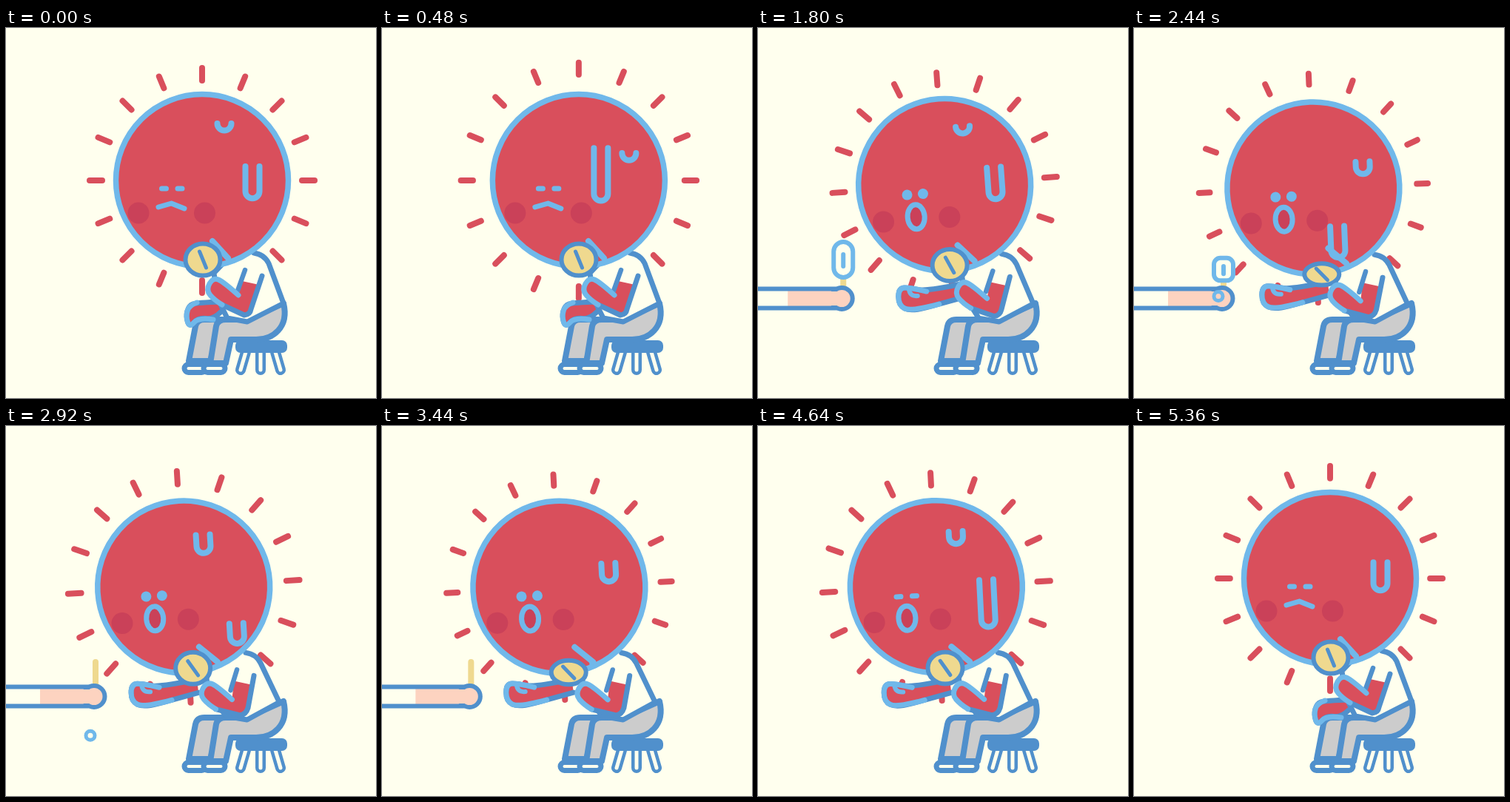
An HTML page for the animation above (5400 ms loop, 500 by 500 pixels).

```html
<!DOCTYPE html>
<html lang="en">
<head>
<meta charset="utf-8">
<title>Melting sun</title>
<style>
  html, body { margin: 0; width: 100%; height: 100%; overflow: hidden; background: #ffffee; }
  svg { display: block; width: 100vw; height: 100vh; }
</style>
</head>
<body>
<svg id="stage" viewBox="0 0 500 500" fill="none" stroke-linecap="round" stroke-linejoin="round"></svg>
<script>
const LOOP = 5400, BEAT = 900, STEP = 40;
const RED = '#d94f5c', CHEEK = '#ca4159', LIGHT = '#70b8ea', DARK = '#5090cc';
const YELLOW = '#efd98f', PEACH = '#fdd3c0', GRAY = '#cccccc', PAPER = '#ffffee';
const stage = document.getElementById('stage');

const clamp = v => Math.min(1, Math.max(0, v));
const mix = (a, b, k) => a + (b - a) * k;
const mixPoint = (a, b, k) => [mix(a[0], b[0], k), mix(a[1], b[1], k)];
const shift = (pts, dx, dy) => pts.map(([x, y]) => [x + dx, y + dy]);
const progress = (t, start, length) => clamp((t - start) / length);
const ease = k => k * k * (3 - 2 * k);
const easeOut = k => 1 - (1 - k) ** 3;
const hump = k => Math.sin(Math.PI * clamp(k));

const path = (d, stroke, width = 7, fill = 'none') =>
  `<path d="${d}" stroke="${stroke}" stroke-width="${width}" fill="${fill}"/>`;
const line = (x1, y1, x2, y2, stroke, width) => path(`M${x1} ${y1}L${x2} ${y2}`, stroke, width);
const oval = (x, y, rx, ry, fill, stroke = 'none', width = 0) =>
  `<ellipse cx="${x}" cy="${y}" rx="${rx}" ry="${ry}" fill="${fill}" stroke="${stroke}" stroke-width="${width}"/>`;
const box = (x, y, w, h, r, fill, stroke = 'none', width = 0) =>
  `<rect x="${x}" y="${y}" width="${w}" height="${h}" rx="${r}" fill="${fill}" stroke="${stroke}" stroke-width="${width}"/>`;
const straight = pts => 'M' + pts.map(p => p.join(' ')).join('L');

// Open curve through the midpoints of a polyline.
function curve(pts) {
  let d = `M${pts[0].join(' ')}`;
  for (let i = 1; i < pts.length - 1; i++) {
    const end = i === pts.length - 2 ? pts[i + 1] : mixPoint(pts[i], pts[i + 1], 0.5);
    d += `Q${pts[i].join(' ')} ${end.join(' ')}`;
  }
  return d;
}

// The figure leans towards the visitor, then settles back.
function pose(t) {
  const since = Math.max(0, t - 1480), stay = 1 - ease(progress(t, 4520, 740));
  const spring = 1 - Math.exp(-since / 650) * Math.cos(since * 0.0067);
  return { lean: stay * (1 - Math.exp(-since / 470)), tilt: -3.1 * stay * spring };
}

// The upper body bends above the hip.
const bow = (pts, lean) => pts.map(([x, y]) => {
  const k = lean * clamp((398 - y) / 50);
  return [x - 11.5 * k, y + 2.5 * k];
});

// A bead swells, stretches downwards and finally lets go at the top.
function sweat(x, start, gravity, age) {
  const fall = 0.03 * age + gravity * age * age;
  const top = start + fall * mix(0.35, 0.85, ease(progress(age, 560, 100)));
  if (age < 0 || top > 115) return '';
  return path(`M${x - 9.5} ${top}V${start + fall}a9.5 9.5 0 0 0 19 0V${top}`, LIGHT, 8);
}

function rays(phase) {
  const inner = 135 + 8 * hump(phase / BEAT) ** 2, outer = 152 + 8 * hump(phase / 800) ** 2;
  let s = '';
  for (let i = 0; i < 16; i++)
    s += `<g transform="rotate(${i * 22.5})">${line(inner, 0, outer, 0, RED, 8)}</g>`;
  return s;
}

function face(t) {
  const awake = t >= 1600 && t < 4600, gasping = t >= 1600 && t < 4920;
  const eyes = [-51.5, -30].map(x => awake ? oval(x, 10, 7, 7, LIGHT) : line(x - 3, 11, x + 3, 11, LIGHT, 7)).join('');
  const mouth = gasping ? oval(-41.5, 40.5, 11.5, 16.5, CHEEK, LIGHT, 7) : path('M-59 36L-41.5 31L-24 38', LIGHT, 7);
  return oval(-86, 44, 14.5, 14.5, CHEEK) + oval(3.5, 44, 14.5, 14.5, CHEEK) + eyes + mouth;
}

function sun(t, phase) {
  const beads = sweat(30, -77, 0.00035, phase) +
    sweat(68, -37, 0.00021, phase - 470) + sweat(68, -37, 0.00021, phase + BEAT - 470);
  return oval(0, 0, 116.5, 116.5, RED, LIGHT, 7.5) + face(t) + `<g clip-path="url(#disc)">${beads}</g>`;
}

function stool() {
  const legs = [-1, 0, 1].map(side => {
    const top = 344 + 20 * side, foot = 344 + 27 * side;
    return line(top, 438, foot, 462, DARK, 14) + line(top, 438, foot, 462, PAPER, 5);
  }).join('');
  return legs + box(310, 422, 70, 17, 7, DARK);
}

function legs() {
  const shoe = x => box(x, 454.5, 29, 11, 5.5, PAPER, DARK, 7);
  return path('M247 450L256 403Q258 394 268 394H292L276 450Z', DARK, 8, GRAY) +
    path('M276 453L284 403Q286 394 297 394H326L375 372C383 405 360 421 338 421H304L297 453Z', DARK, 8, GRAY) +
    shoe(241) + shoe(267);
}

function farArm(lean) {
  const rest = [[292, 370], [258, 371], [247, 375], [243, 390], [248, 405], [260, 391], [280, 394], [290, 384]];
  const reach = [[256, 342], [205, 353], [184, 348], [167, 348], [167, 372], [184, 380], [222, 370], [258, 360]];
  const dx = 45 * (1 - lean), dy = 6 * (1 - lean), k = ease(clamp(lean / 0.45));
  const pts = shift(reach, dx, dy).map((p, i) => mixPoint(rest[i], p, k));
  const thumb = k > 0.5 ? path(`M${181 + dx} ${349 + dy}q1 11 12 10`, LIGHT, 6) : '';
  return path(curve(pts), DARK, 7, RED) + path(curve(pts.slice(1, 7)), LIGHT, 7) + thumb;
}

function torso(lean) {
  const front = bow([[300, 311], [281, 331], [283, 346], [291, 376], [299, 392], [326, 397], [375, 372]], lean);
  const [slope, bend, shoulder] = bow([[355, 318], [349, 306], [335, 304]], lean).map(p => p.join(' '));
  return path(`${straight(front)}L${slope}Q${bend} ${shoulder}`, DARK, 7, PAPER);
}

function nearArm(lean) {
  const hand = shift([[314, 361], [294, 343], [280, 337], [270, 354], [282, 368], [292, 374]], -9 * lean, 9 * lean);
  const elbow = shift([[322, 388], [330, 387]], -6 * lean, 3 * lean);
  const [a, b, c, d, back, front] = bow([[323, 327], [313, 355], [346, 335], [331, 380], [342, 347], [319, 342]], lean);
  return path(`${curve(hand)}L${straight([...elbow, back, front]).slice(1)}Z`, 'none', 0, RED) +
    path(`${straight([hand[5], elbow[0]])}Q${elbow[1].join(' ')} ${d.join(' ')}L${c.join(' ')}`, DARK, 7) +
    path(straight([a, b]), DARK, 6.5) + path(curve(hand), LIGHT, 7);
}

function neck(lean, phase) {
  const press = hump((phase - 500) / 330);
  const x = mix(266, 252, lean), y = mix(313, 328, lean) + 7 * press;
  const dx = mix(4.5, 7, lean) + press, dy = mix(11, 9.5, lean) - 2 * press;
  const [sx, sy] = mixPoint([279, 288], [260, 299], lean);
  return line(sx, sy, sx + mix(21, 25, lean), sy + mix(23, 20, lean), LIGHT, 8) +
    oval(x, y, 23.5, 21.5 - 7 * press, YELLOW, DARK, 6) + line(x - dx, y - dy, x + dx, y + dy, DARK, 5);
}

function flame(x, t) {
  const melt = progress(t, 2260, 620);
  if (melt === 1) return '';
  const top = mix(289, 342, melt ** 0.72), h = 337 + 5 * clamp(melt * 3) - top;
  const mid = top + h / 2 + 1, half = h / 6;
  return box(x - 13, top, 26, h, Math.min(13, h * 0.28), PAPER, LIGHT, 6) +
    line(x, mid - half, x, mid + half, LIGHT, 6);
}

function visitor(t) {
  const edge = -115 + 132 * easeOut(progress(t, 620, 380)) + 29 * ease(progress(t, 1300, 700)) -
    161 * progress(t, 3360, 500) ** 3;
  const palm = edge + 73, x = edge + 75, top = 352.5, bottom = 378.5, wrist = palm - 8;
  let s = line(x, 319, x, 352, YELLOW, 8) + flame(x, t) +
    path(`M-20 ${top}H${wrist}V${bottom}H-20Z`, 'none', 0, PAPER) + box(edge, top, 70, 26, 0, PEACH) +
    oval(palm, 365.5, 14.5, 14.5, PEACH, DARK, 6) + box(palm - 22, 356, 17, 19, 0, PEACH) +
    path(`M-20 ${top}H${wrist}M-20 ${bottom}H${wrist}`, DARK, 6);
  for (let i = 0; i < 3; i++) {
    const fall = (t - 2360 - 340 * i) / 280;
    if (fall > 0 && fall < 1) s += oval(x - 7, 354 + 104 * fall * fall, 6, 6, 'none', LIGHT, 5);
  }
  return s;
}

function draw(t) {
  const phase = t % BEAT, { lean, tilt } = pose(t);
  const x = mix(265, 239, lean) + hump(t / 1480), y = mix(206, 218, lean);
  const place = `translate(${x} ${y}) rotate(${tilt})`;
  stage.innerHTML = `<clipPath id="disc"><circle r="117"/></clipPath>
    <g transform="${place}">${rays(phase)}</g>
    ${stool()}${legs()}${farArm(lean)}${torso(lean)}
    <g transform="${place}">${sun(t, phase)}</g>
    ${neck(lean, phase)}${nearArm(lean)}${visitor(t)}`;
}

const began = performance.now();
function frame() {
  const t = (performance.now() - began) % LOOP;
  draw(Math.floor(t / STEP) * STEP);
  requestAnimationFrame(frame);
}
frame();
</script>
</body>
</html>
```
